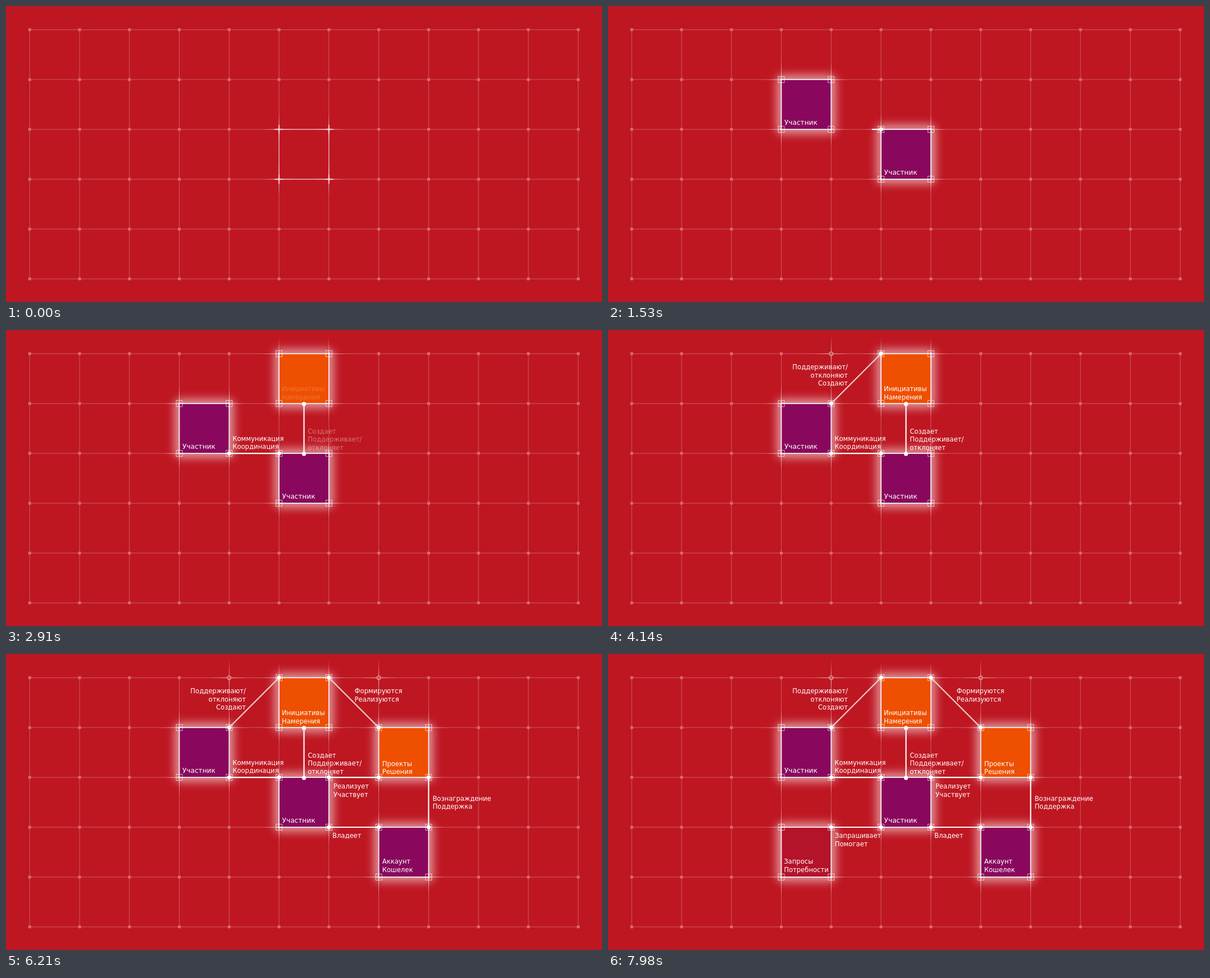
Write an HTML page that moves like this. It is 1061 px wide and 528 px high and loops after 8 s.

```html
<!DOCTYPE html>
<html lang="ru">
<head>
<meta charset="utf-8">
<title>Схема взаимодействия</title>
<style>
html, body { margin: 0; width: 100%; height: 100%; overflow: hidden; background: #be1722; }
svg { display: block; width: 100%; height: 100%; }
text { font-family: "DejaVu Sans", Verdana, sans-serif; fill: #fff; }
</style>
</head>
<body>
<svg id="stage" viewBox="0 0 1061 528">
  <defs>
    <filter id="soft" x="-60%" y="-60%" width="220%" height="220%">
      <feGaussianBlur stdDeviation="7.5"/>
    </filter>
    <radialGradient id="ray">
      <stop offset="0" stop-color="#fff" stop-opacity=".75"/>
      <stop offset=".45" stop-color="#fff" stop-opacity=".35"/>
      <stop offset="1" stop-color="#fff" stop-opacity="0"/>
    </radialGradient>
  </defs>
</svg>
<script>
const LOOP = 8000, STEP = 30, LEADING = 14.5;
const PURPLE = '#89085d', ORANGE = '#ee4f00', RED = '#b4132a';
const stage = document.getElementById('stage');
const gx = i => 42.2 + i * 88.77;
const gy = j => 42.3 + j * 88.9;

function add(tag, attrs, parent = stage) {
  const el = document.createElementNS('http://www.w3.org/2000/svg', tag);
  for (const k in attrs) el.setAttribute(k, attrs[k]);
  parent.appendChild(el);
  return el;
}

const clamp = v => Math.max(0, Math.min(1, v));
const ramp = (t, from, to) => clamp((t - from) / (to - from));
const smooth = v => v * v * (3 - 2 * v);
const show = (el, v) => el.setAttribute('opacity', v.toFixed(3));

// each entry updates one element for a given time
const updates = [];
const fade = (el, from, to) => updates.push(t => show(el, smooth(ramp(t, from, to))));

function drawGrid() {
  let d = '', dots = '';
  for (let i = 0; i < 12; i++) d += `M${gx(i)} ${gy(0)}V${gy(5)}`;
  for (let j = 0; j < 6; j++) {
    d += `M${gx(0)} ${gy(j)}H${gx(11)}`;
    for (let i = 0; i < 12; i++) dots += `M${gx(i) - 2.5} ${gy(j) - 2.5}h5v5h-5z`;
  }
  add('path', { d, stroke: '#fff', 'stroke-opacity': .29, fill: 'none' });
  add('path', { d: dots, fill: '#db696d' });
}

function rays(x, y, parent) {
  add('ellipse', { cx: x, cy: y, rx: 35, ry: .9, fill: 'url(#ray)' }, parent);
  add('ellipse', { cx: x, cy: y, rx: .9, ry: 35, fill: 'url(#ray)' }, parent);
}

function label(lines, x, y, from, to, { size = 11.6, anchor = 'start' } = {}) {
  const text = add('text', { 'font-size': size, 'text-anchor': anchor });
  lines.split('|').forEach((line, n) => {
    add('tspan', { x, y: y + n * LEADING }, text).textContent = line;
  });
  fade(text, from, to);
}

// a glowing cell: rays and outline lead, fill and glow follow
function cell(i, j, color, start, end, lead = start) {
  const x = gx(i), y = gy(j), w = gx(1) - gx(0), h = gy(1) - gy(0);
  const corners = [[x, y], [x + w, y], [x, y + h], [x + w, y + h]];
  const group = add('g', {});
  const body = add('g', {}, group);
  add('rect', { x: x - 9, y: y - 9, width: w + 18, height: h + 18, rx: 12,
    fill: '#fff', opacity: .5, filter: 'url(#soft)' }, body);
  add('rect', { x, y, width: w, height: h, fill: color }, body);
  const edge = add('rect', { x, y, width: w, height: h, fill: 'none',
    stroke: '#f6eef4', 'stroke-width': 1.8 }, group);
  const glints = add('g', {}, group);
  const marks = add('g', {}, group);
  for (const [cx, cy] of corners) {
    rays(cx, cy, group);
    add('path', { d: `M${cx - 8} ${cy}h16M${cx} ${cy - 8}v16`,
      stroke: '#e2b4b0', 'stroke-width': 2 }, glints);
    add('path', { d: `M${cx - 5.5} ${cy - 5.5}h11v11h-11zM${cx - 5} ${cy}h10M${cx} ${cy - 5}v10`,
      stroke: '#fff', 'stroke-opacity': .68, fill: 'none' }, marks);
  }
  updates.push(t => {
    const p = smooth(ramp(t, start, end));
    show(group, ramp(t, lead, lead + 150));
    show(body, p);
    show(edge, .5 + .5 * p);
    show(glints, 1 - p);
    show(marks, p);
  });
}

// a line that grows from one node to the next
function link(x1, y1, x2, y2, from, to, color = '#fff') {
  const line = add('line', { x1, y1, stroke: color, 'stroke-width': 2.2 });
  const dots = [[x1, y1], [x2, y2]].map(([cx, cy]) => add('circle', { cx, cy, r: 3.7, fill: '#fff' }));
  updates.push(t => {
    const p = ramp(t, from, to);
    line.setAttribute('x2', x1 + (x2 - x1) * p);
    line.setAttribute('y2', y1 + (y2 - y1) * p);
    show(line, t >= from ? 1 : 0);
    show(dots[0], ramp(t, from - 60, from));
    show(dots[1], ramp(t, to - 30, to + 30));
  });
}

function node(i, j, from, to) {
  const group = add('g', {});
  rays(gx(i), gy(j), group);
  add('circle', { cx: gx(i), cy: gy(j), r: 3.3, fill: '#c9545b', stroke: '#e4a1a4', 'stroke-width': 1.2 }, group);
  fade(group, from, to);
}

drawGrid();

cell(5, 2, PURPLE, 30, 600, -200);
cell(3, 1, PURPLE, 930, 1400, 840);
cell(5, 0, ORANGE, 2550, 2850, 2490);
cell(7, 1, ORANGE, 4620, 4980, 4560);
cell(7, 3, PURPLE, 5460, 5850, 5400);
cell(3, 3, RED, 7020, 7620, 6930);
node(4, 0, 3600, 4140);
node(7, 0, 4500, 4800);

link(gx(5), gy(2), gx(4), gy(2), 1470, 1800);
link(530.5, 221, 530.5, 132, 2520, 2840);
link(gx(4), gy(1), gx(5), gy(0), 3360, 3720, '#ead0cf');
link(gx(6), gy(0), gx(7), gy(1), 4470, 4800, '#ead0cf');
link(gx(6), gy(2), gx(7), gy(2), 4560, 4890);
link(gx(8), gy(2), gx(8), gy(3), 5310, 5640);
link(gx(6), gy(3), gx(7), gy(3), 5400, 5730);
link(gx(5), gy(3), gx(4), gy(3), 6810, 7140);

label('Участник', 491.6, 301, 420, 810, { size: 12.15 });
label('Участник', 313.9, 212, 1110, 1500, { size: 12.15 });
label('Коммуникация|Координация', 403.2, 197.5, 1830, 2310);
label('Создает|Поддерживает/|отклоняет', 537.2, 184.5, 2730, 3150);
label('Инициативы|Намерения', 491, 109, 2790, 3210);
label('Поддерживают/|отклоняют|Создают', 427, 70, 3660, 4080, { anchor: 'end' });
label('Формируются|Реализуются', 620.6, 70, 4710, 5100);
label('Проекты|Решения', 669.7, 199.5, 4740, 5130);
label('Реализует|Участвует', 583, 240, 4740, 5130);
label('Вознаграждение|Поддержка', 759.4, 261.5, 5580, 5970);
label('Владеет', 581, 328, 5640, 6030);
label('Аккаунт|Кошелек', 669.8, 374, 5640, 6030);
label('Запрашивает|Помогает', 403.8, 328, 7140, 7590);
label('Запросы|Потребности', 313.2, 374, 7350, 7800);

function render(ms) {
  const t = Math.floor((ms % LOOP) / STEP) * STEP;
  for (const update of updates) update(t);
}

const began = performance.now();
function tick() {
  render(performance.now() - began);
  requestAnimationFrame(tick);
}
tick();
</script>
</body>
</html>
```
